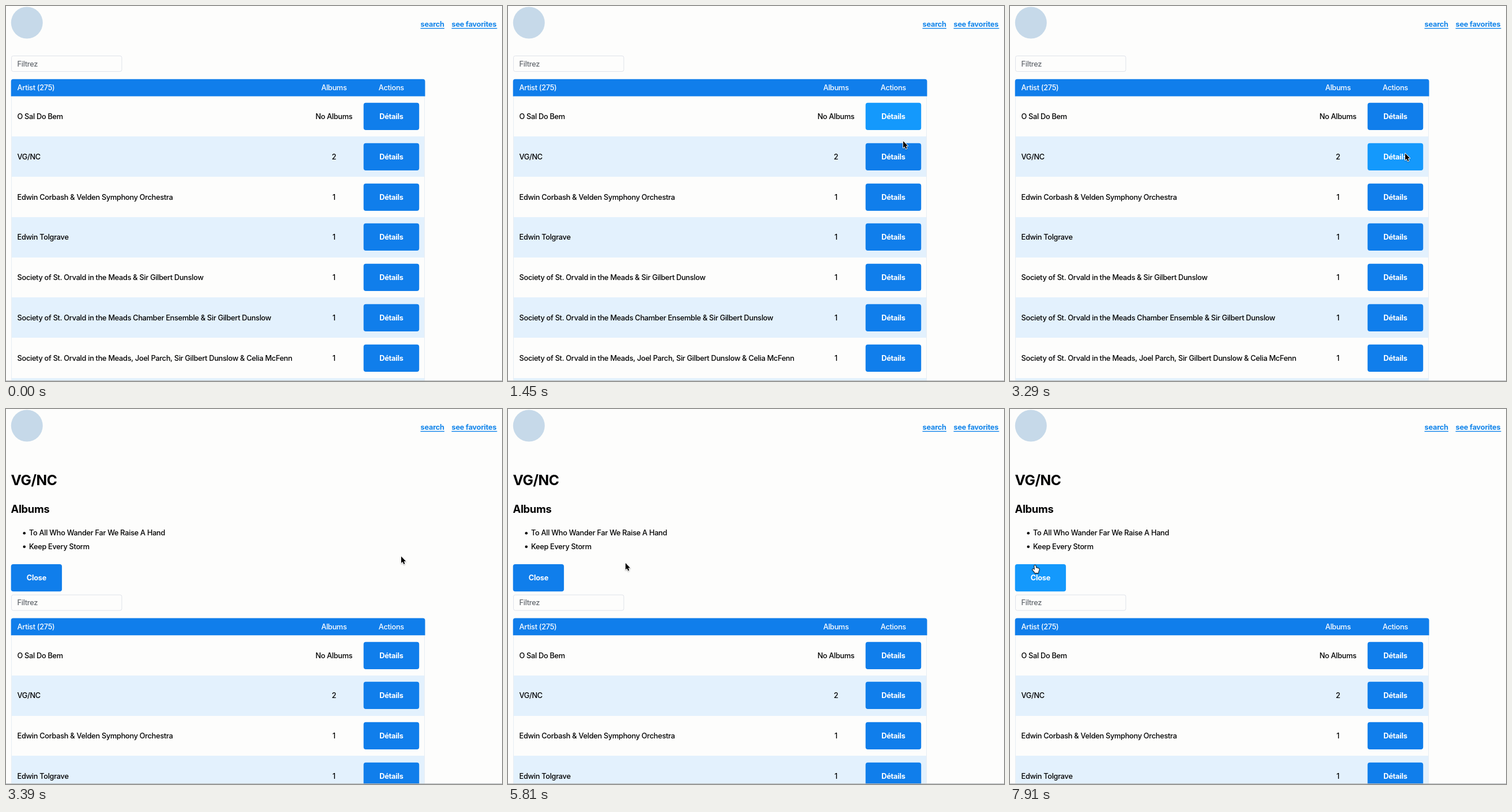
Animation, 861 px wide and 650 px high, one loop 8000 ms. Source, as an HTML page with a canvas:

```html
<!DOCTYPE html>
<html lang="en">
<head>
<meta charset="utf-8">
<title>Artist list</title>
<style>
  html, body { margin: 0; width: 100%; height: 100%; overflow: hidden; background: #fdfdfc; }
  canvas { display: block; width: 861px; height: 650px; }
</style>
</head>
<body>
<canvas id="stage" width="861" height="650"></canvas>
<script>
const ctx = document.getElementById("stage").getContext("2d");
const LOOP = 8000, OPEN_AT = 3390, HOVER_LAG = 100;
const PAGE = "#fdfdfc", BLUE = "#107eeb", HOVER = "#1499fc", STRIPE = "#e3f1fd", LINK = "#1385ea";
const ROW_H = 69.83, DETAIL_H = 235.65, BUTTON_H = 47.3;

const artists = [
  ["O Sal Do Bem", "No Albums"],
  ["VG/NC", "2"],
  ["Edwin Corbash & Velden Symphony Orchestra", "1"],
  ["Edwin Tolgrave", "1"],
  ["Society of St. Orvald in the Meads & Sir Gilbert Dunslow", "1"],
  ["Society of St. Orvald in the Meads Chamber Ensemble & Sir Gilbert Dunslow", "1"],
  ["Society of St. Orvald in the Meads, Joel Parch, Sir Gilbert Dunslow & Celia McFenn", "1"],
  ["", ""]
];
const albums = ["To All Who Wander Far We Raise A Hand", "Keep Every Storm"];

const ease = {
  line: u => u,
  start: u => u * u,
  stop: u => 1 - (1 - u) * (1 - u),
  both: u => u * u * (3 - 2 * u)
};

// Pointer stops: time, x, y, easing used to get there
const path = [
  [850, 716, -20, "line"],
  [1450, 686, 234, "line"],
  [1650, 686, 255.5, "stop"],
  [4250, 686, 255.5, "line"],
  [5110, 478, 268.5, "start"],
  [5800, 204, 267, "stop"],
  [6930, 204, 267, "line"],
  [7700, 43.5, 271, "both"]
];

function pointer(t) {
  if (t < path[0][0]) return { x: -50, y: -50 };
  const i = path.findIndex(p => p[0] > t);
  if (i < 0) return { x: path.at(-1)[1], y: path.at(-1)[2] };
  const [t0, x0, y0] = path[i - 1], [t1, x1, y1, kind] = path[i];
  const u = ease[kind]((t - t0) / (t1 - t0));
  return { x: x0 + (x1 - x0) * u, y: y0 + (y1 - y0) * u };
}

const inside = (p, x, y, w, h) => p.x >= x && p.x <= x + w && p.y >= y && p.y <= y + h;

function text(str, x, y, { size = 12.8, weight = 450, color = "#000", align = "left" } = {}) {
  ctx.font = `${weight} ${size}px Inter, "Open Sans", sans-serif`;
  ctx.letterSpacing = `${(weight < 700 ? -0.024 : -0.018) * size}px`;
  ctx.textAlign = align;
  ctx.fillStyle = color;
  ctx.fillText(str, x, y);
}

function box(x, y, w, h, r, fill, stroke) {
  ctx.beginPath();
  ctx.roundRect(x, y, w, h, r);
  if (fill) { ctx.fillStyle = fill; ctx.fill(); }
  if (stroke) { ctx.strokeStyle = stroke; ctx.lineWidth = 1; ctx.stroke(); }
}

function button(label, x, y, w, mouse) {
  box(x, y, w, BUTTON_H, 4, inside(mouse, x, y, w, BUTTON_H) ? HOVER : BLUE);
  text(label, x + w / 2, y + 28.2, { weight: 700, color: "#fff", align: "center" });
}

function link(label, x, w) {
  text(label, x, 36, { weight: 700, color: LINK });
  ctx.fillStyle = LINK;
  ctx.fillRect(x, 38, w, 1.4);
}

function header() {
  ctx.fillStyle = "#c6d9e9";
  ctx.beginPath();
  ctx.arc(36.3, 29, 27.5, 0, Math.PI * 2);
  ctx.fill();
  link("search", 719.5, 41.5);
  link("see favorites", 773.5, 79);
}

function details(mouse) {
  text(artists[1][0], 8.5, 131.5, { size: 24.6, weight: 700 });
  text("Albums", 8.5, 179.5, { size: 18.4, weight: 700 });
  albums.forEach((name, i) => {
    const y = 214.5 + i * 23.6;
    ctx.fillStyle = "#000";
    ctx.beginPath();
    ctx.arc(31.8, y + 0.7, 2.3, 0, Math.PI * 2);
    ctx.fill();
    text(name, 40, y + 4.4);
  });
  button("Close", 8.7, 268.9, 88.4, mouse);
}

function table(top, mouse) {
  box(9.5, top + 86.5, 191.5, 27, 3, null, "#dfe3ea");
  text("Filtrez", 19.5, top + 104.7, { color: "#656a70" });

  artists.forEach(([name, count], i) => {
    const y = top + 156.3 + i * ROW_H;
    const buttonY = Math.round(y + 11.6);
    if (i % 2) {
      ctx.fillStyle = STRIPE;
      ctx.fillRect(9, Math.round(y), 718, Math.round(ROW_H));
    }
    text(name, 19.5, buttonY + 28);
    text(count, 569.3, buttonY + 28, { align: "center" });
    button("Détails", 620.7, buttonY - 0.2, 96.5, mouse);
  });
  ctx.fillStyle = "#e6edf3";
  ctx.fillRect(9, top + 156, 1, 650);
  ctx.fillRect(726, top + 156, 1, 650);

  box(8.7, top + 126.8, 718.8, 29.8, [4, 4, 0, 0], BLUE);
  const white = { color: "#fff", weight: 500 };
  text("Artist (275)", 19.5, top + 146.4, white);
  text("Albums", 569.3, top + 146.4, { ...white, align: "center" });
  text("Actions", 668.8, top + 146.4, { ...white, align: "center" });
}

const arrow = new Path2D("M0 0V11.6L2.6 9.2L4.5 13.5L6.4 12.6L4.6 8.4H8.1Z");
const hand = new Path2D("M-1.2 .6Q0-.8 1.1.7L1.6 4.6Q2.9 3.7 3.7 5Q5 4.3 5.6 5.6Q7 5.2 7.1 6.8" +
  "Q7 9.3 5.7 11V13H-.4L-1 11.4L-4.3 7.7Q-4.4 6 -2.6 6.5L-.6 8Z");

function cursor(p, isHand) {
  ctx.save();
  ctx.translate(p.x, p.y);
  ctx.lineJoin = "round";
  ctx.shadowColor = "rgba(0,0,0,.3)";
  ctx.shadowBlur = 2;
  ctx.shadowOffsetY = 1;
  ctx.strokeStyle = isHand ? "#111" : "#fff";
  ctx.fillStyle = isHand ? "#fff" : "#000";
  ctx.lineWidth = 1.8;
  const shape = isHand ? hand : arrow;
  ctx.stroke(shape);
  ctx.shadowColor = "transparent";
  ctx.fill(shape);
  ctx.restore();
}

function draw(t) {
  const open = t >= OPEN_AT;
  const mouse = pointer(t), late = pointer(t - HOVER_LAG);
  ctx.fillStyle = PAGE;
  ctx.fillRect(0, 0, 861, 650);
  header();
  if (open) details(late);
  table(open ? DETAIL_H : 0, late);
  ctx.fillStyle = "#b4b7b9";
  ctx.fillRect(0, 649, 861, 1);
  cursor(mouse, open && inside(mouse, 9, 269, 88, BUTTON_H));
}

const begin = performance.now();
function tick() {
  draw((performance.now() - begin) % LOOP);
  requestAnimationFrame(tick);
}
tick();
</script>
</body>
</html>
```
